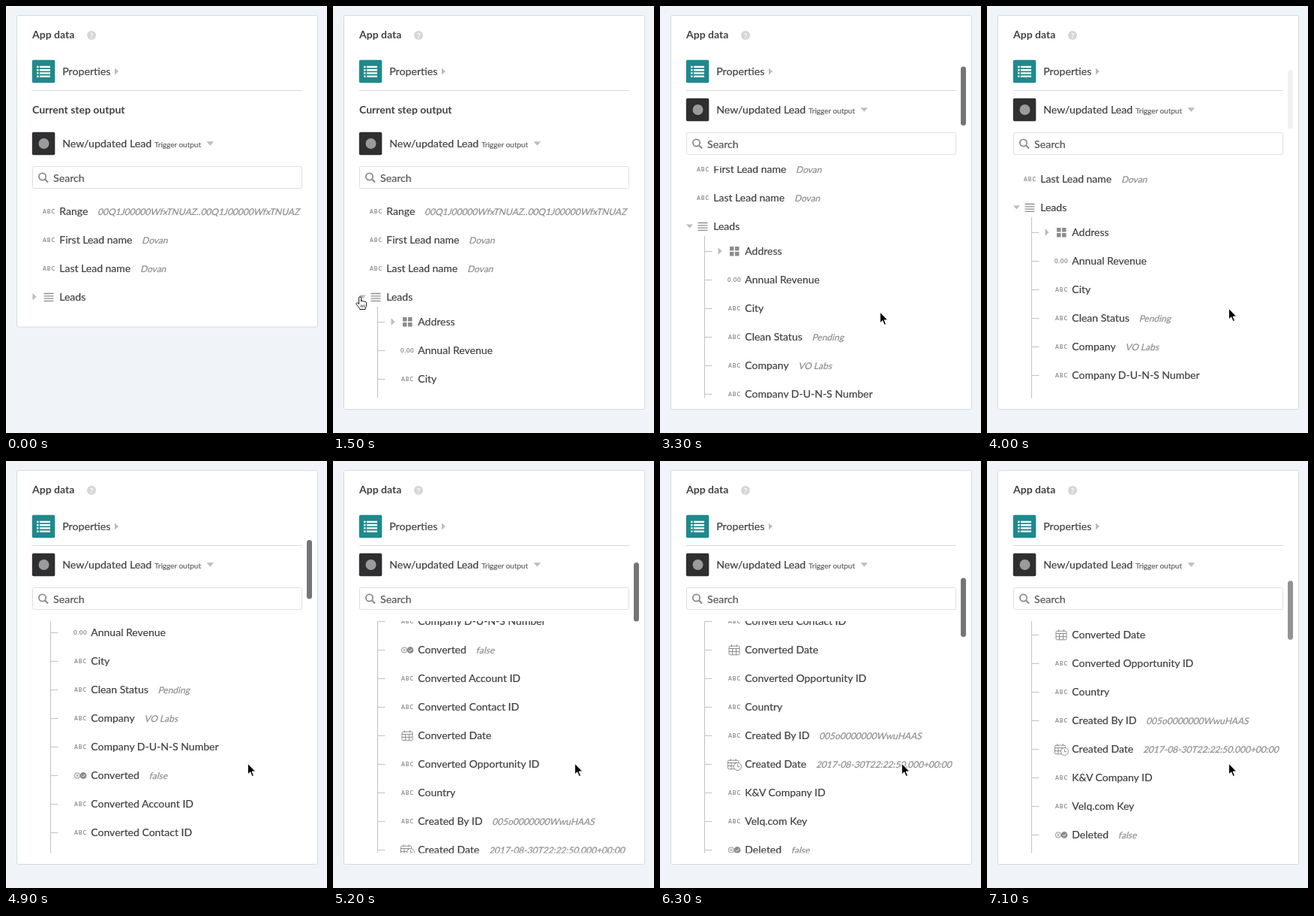
An HTML page that plays this animation: 428x568 px, repeating every 7200 ms.

```html
<!DOCTYPE html>
<html lang="en">
<head>
<meta charset="utf-8">
<title>App data picker</title>
<style>
  html, body { margin: 0; width: 100%; height: 100%; overflow: hidden; background: #f0f4f8; }
  svg { display: block; }
  text { font: 14px Lato, sans-serif; color: #424242; fill: currentColor; stroke: currentColor; stroke-width: .22px; }
  .bold { font-weight: 700; stroke: none; }
  .head { font-size: 14.2px; }
  .value { font-size: 12px; color: #8f8f8f; }
  .small { font-size: 10px; color: #666; }
  .type { font-size: 7px; font-weight: 700; letter-spacing: 1px; color: #888; stroke: none; }
  .num { font-size: 8px; letter-spacing: .6px; }
  .tri { fill: #bcbcbc; }
  .line { fill: none; stroke: #c2c2c2; }
  .icon { fill: none; stroke: #8c8c8c; }
  .solid { fill: #8c8c8c; stroke: none; }
</style>
</head>
<body>
<svg width="428" height="568" viewBox="0 0 428 568">
  <defs>
    <clipPath id="view"><rect x="15" y="113" width="400" height="408.5"/></clipPath>
    <!-- row icons, centred on 0,0 -->
    <g id="grid" class="solid">
      <path d="M-6-6h5.5v5.5H-6zM1-6h5.5v5.5H1zM-6 1h5.5v5.5H-6zM1 1h5.5v5.5H1z"/>
    </g>
    <g id="list" class="icon"><path d="M-6.5-4.5h13m-13 3.3h13m-13 3.3h13m-13 3.3h13" stroke-width="1.3"/></g>
    <g id="date" class="icon">
      <rect x="-7" y="-4.8" width="14" height="11.6" rx="1.5"/>
      <path d="M-7-1.5H7M-7 2.6H7M-2.5-1.5v8.3M2.5-1.5v8.3M-3.5-6.8v3M3.5-6.8v3"/>
    </g>
    <g id="time">
      <use href="#date" x="-1.5"/>
      <g class="icon">
        <circle cx="4.5" cy="3.5" r="5" fill="#fff"/>
        <path d="M4.5.5v3.2h2.6"/>
      </g>
    </g>
    <g id="bool" class="icon">
      <circle cx="-4" cy=".5" r="3.7"/>
      <path d="M-5.5-1l3 3m0-3l-3 3"/>
      <circle class="solid" cx="4" cy=".5" r="4.4"/>
      <path d="M2 .6l1.5 1.5 2.6-3" stroke="#fff"/>
    </g>
  </defs>

  <rect id="panel" x="14.5" y="12.5" width="401" rx="2" fill="#fff" stroke="#d3dce1"/>
  <text class="bold" x="35" y="43">App data</text>
  <circle cx="114" cy="39" r="6" fill="#d6d6d6"/>
  <text x="114" y="42.5" text-anchor="middle" class="bold" style="font-size:10px;color:#fff">?</text>

  <rect x="34.8" y="71.8" width="30.5" height="30.5" rx="2" fill="#1f898d"/>
  <path d="M41 81h2.6m-2.6 4.2h2.6m-2.6 4.2h2.6m-2.6 4.2h2.6M45 81h14m-14 4.2h14m-14 4.2h14m-14 4.2h14" stroke="#fff" stroke-width="2.4"/>
  <text class="head" x="75.2" y="92">Properties</text>
  <path class="tri" d="M145 82.5l5 4.5-5 4.5z"/>
  <path d="M35 112.5h360" stroke="#d8dadc"/>

  <g clip-path="url(#view)">
    <g id="content">
      <text class="bold" x="35" y="143">Current step output</text>
      <g id="rows"></g>
      <g id="closed"><path class="tri" d="M35.5 382l5 4.7-5 4.7z"/></g>
      <g id="open">
        <path class="tri" d="M35 384.5h9l-4.5 5z"/>
        <path class="line" d="M59.5 400V1100"/>
        <path class="tri" d="M77.5 415.3l5 4.7-5 4.7z"/>
        <g id="kids"></g>
      </g>
    </g>
    <g id="sticky">
      <rect x="30" y="158" width="368" height="100" fill="#fff"/>
      <rect x="34.8" y="167.8" width="30.5" height="30.5" rx="2" fill="#2f2f31"/>
      <circle cx="50.5" cy="183" r="7" fill="#9b9b9b"/>
      <text class="head" x="75.2" y="188">New/updated Lead</text>
      <text class="small" x="198" y="188">Trigger output</text>
      <path class="tri" d="M267.5 180.3h9.5l-4.75 5.5z"/>
      <rect x="35.5" y="213.5" width="359" height="29" rx="2" fill="#fff" stroke="#dcdfe1"/>
      <g class="icon" stroke-width="1.8">
        <circle cx="48.5" cy="227" r="4.6"/>
        <path d="M52 230.5l4 4" stroke-width="2.2"/>
      </g>
      <text class="head" x="63" y="234" style="color:#555">Search</text>
    </g>
  </g>

  <rect id="bar" x="401" width="7" height="78.5" rx="3.5" fill="#757575"/>
  <g id="cursor">
    <path id="arrow" d="M0 0V14.4L3.3 11.3 5.7 17 8 16 5.6 10.5H10.2Z" stroke="#fff" stroke-width=".9"/>
    <g id="hand" transform="translate(-6 -1)" fill="#fff" stroke="#111" stroke-linejoin="round">
      <path d="M4.6 10.5V2.1C4.6.2 7.6.2 7.6 2.1V7C7.7 5.6 10 5.7 10.1 7.2 10.4 6.2 12.4 6.4 12.5 7.8 13 7 14.6 7.4 14.6 8.8V12C14.6 14.5 13.2 15 13 17.5H5.8C5.4 15.5 2.6 12.8 1.2 10.8.2 9.2 2.2 8 3.3 9.2Z"/>
      <path d="M7.6 11.5v3.5m2.2-3.5v3.5m2.2-3.5v3.5" stroke-width=".8"/>
    </g>
  </g>
</svg>
<script>
const $ = id => document.getElementById(id);
const LOOP = 7200, STEP = 100;

const fields = [
  ["abc", "Range", "00Q1J00000WfxTNUAZ..00Q1J00000WfxTNUAZ"],
  ["abc", "First Lead name", "Dovan"],
  ["abc", "Last Lead name", "Dovan"],
  ["list", "Leads"]
];
const leadFields = [
  ["grid", "Address"],
  ["num", "Annual Revenue"],
  ["abc", "City"],
  ["abc", "Clean Status", "Pending"],
  ["abc", "Company", "VO Labs"],
  ["abc", "Company D-U-N-S Number"],
  ["bool", "Converted", "false"],
  ["abc", "Converted Account ID"],
  ["abc", "Converted Contact ID"],
  ["date", "Converted Date"],
  ["abc", "Converted Opportunity ID"],
  ["abc", "Country"],
  ["abc", "Created By ID", "005o0000000WwuHAAS"],
  ["time", "Created Date", "2017-08-30T22:22:50.000+00:00"],
  ["abc", "K&amp;V Company ID"],
  ["abc", "Velq.com Key"],
  ["bool", "Deleted", "false"]
];

function icon(type, x, y) {
  if (type === "abc") return `<text class="type" x="${x - 22}" y="${y + 3.3}">ABC</text>`;
  if (type === "num") return `<text class="type num" x="${x - 23}" y="${y + 3.3}">0.00</text>`;
  return `<use href="#${type}" x="${x - 14}" y="${y}"/>`;
}
function row([type, label, value], x, y) {
  const extra = value ? `<text class="value" data-x="${x}" data-y="${y + 5}">${value}</text>` : "";
  return icon(type, x, y) + `<text x="${x + .3}" y="${y + 5}">${label}</text>` + extra;
}
$("rows").innerHTML = fields.map((f, i) => row(f, 71, 273 + 38 * i)).join("");
$("kids").innerHTML = leadFields.map((f, i) => {
  const y = 420 + 38 * i;
  return `<path class="line" d="M60 ${y + .5}h9.5"/>` + row(f, 113, y);
}).join("");

// Values are upright letters slanted, set a fixed gap after their label.
for (const v of document.querySelectorAll(".value")) {
  const x = +v.dataset.x + v.previousElementSibling.getComputedTextLength() + 13;
  v.setAttribute("transform", `translate(${x} ${v.dataset.y}) skewX(-14)`);
}

// Each key is [step, value]; one step lasts 100 ms.
const scrollKeys = [
  [29, 0], [30, 8], [31, 35], [32, 68], [33, 94], [34, 109], [35, 116], [36, 119],
  [40, 119], [41, 140], [42, 183], [43, 212],
  [48, 212], [49, 230], [50, 290], [51, 355], [52, 397], [53, 409], [54, 413],
  [58, 413], [59, 426], [60, 451], [61, 477], [62, 497], [63, 511], [64, 524], [65, 531]
];
const barKeys = [[30, 0], [31, 1], [38, 1], [39, .55], [40, .1], [41, 1], [69, 1], [70, .95], [71, .78]];
const xKeys = [[0, 426.5], [8, 36], [19, 36], [25, 264.5], [30, 264.5], [36, 322.4]];
const yKeys = [[0, 567], [8, 387], [19, 387], [25, 412], [30, 412], [36, 402.5]];

const linear = p => p;
const smooth = p => p * p * (3 - 2 * p);
function at(keys, n, ease = linear) {
  const i = keys.findIndex(k => k[0] > n);
  if (i === 0) return keys[0][1];
  if (i < 0) return keys[keys.length - 1][1];
  const [a, from] = keys[i - 1], [b, to] = keys[i];
  return from + (to - from) * ease((n - a) / (b - a));
}
const show = (id, on) => $(id).setAttribute("display", on ? "inline" : "none");
const move = (id, x, y) => $(id).setAttribute("transform", `translate(${x} ${y})`);

function draw(n) {
  const open = n >= 15, hand = n >= 8 && n < 20;
  const scroll = Math.round(at(scrollKeys, n));
  $("panel").setAttribute("height", open ? 524 : 414.5);
  show("open", open);
  show("closed", !open);
  move("content", 0, -scroll);
  move("sticky", 0, -Math.min(scroll, 45));
  $("bar").setAttribute("y", 85 + (scroll - 119) * .18);
  $("bar").setAttribute("opacity", at(barKeys, n));
  move("cursor", at(xKeys, n, smooth), at(yKeys, n, smooth));
  show("hand", hand);
  show("arrow", !hand);
}

const start = performance.now();
let last = -1;
function tick() {
  // small lead keeps step edges from slipping a frame late
  const n = Math.floor(((performance.now() - start + 15) % LOOP) / STEP);
  if (n !== last) draw(last = n);
  requestAnimationFrame(tick);
}
tick();
</script>
</body>
</html>
```
